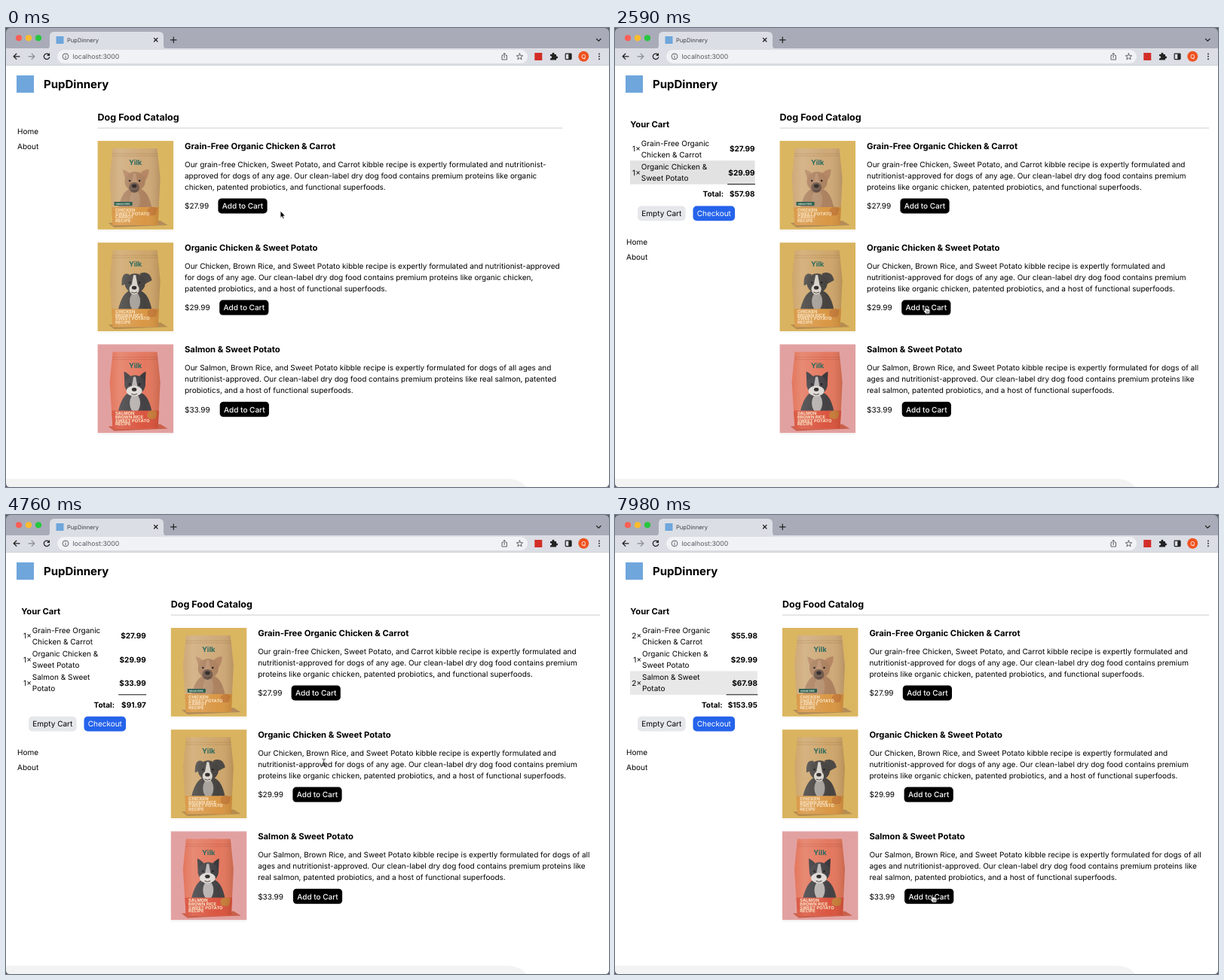
Animation of 800x610 px, one loop 8000 ms. Source, as an HTML page:

```html
<!DOCTYPE html>
<html lang="en">
<head>
<meta charset="utf-8">
<title>PupDinnery</title>
<style>
html, body { margin: 0; width: 100%; height: 100%; overflow: hidden; background: #fff; }
svg { display: block; width: 100vw; height: 100vh; font-family: Inter, sans-serif; font-size: 10px; text-rendering: geometricPrecision; }
</style>
</head>
<body>
<svg id="stage" viewBox="0 0 800 610" xmlns="http://www.w3.org/2000/svg">
  <defs>
    <linearGradient id="sheen">
      <stop offset="0" stop-color="#fff" stop-opacity=".02"/>
      <stop offset=".2" stop-color="#fff" stop-opacity=".16"/>
      <stop offset=".7" stop-color="#fff" stop-opacity=".03"/>
      <stop offset="1" stop-color="#402000" stop-opacity=".16"/>
    </linearGradient>
  </defs>
  <g id="chrome"></g>
  <g id="page"></g>
  <g id="cursor"></g>
</svg>
<script>
const LOOP = 8000, FADE = 700, PITCH = 135.2, ROW = 31.2;
const SHOP = 'PupDinnery', BRAND = 'Yilk';
const $ = id => document.getElementById(id);

const text = (x, y, s, attrs = '') =>
  `<text x="${x}" y="${y}" ${attrs}>${s.replace(/&/g, '&amp;')}</text>`;
const rect = (x, y, w, h, fill, r = 0) =>
  `<rect x="${x}" y="${y}" width="${w}" height="${h}" rx="${r}" fill="${fill}"/>`;
const disc = (x, y, r, fill) => `<circle cx="${x}" cy="${y}" r="${r}" fill="${fill}"/>`;
const oval = (x, y, rx, ry, fill) => `<ellipse cx="${x}" cy="${y}" rx="${rx}" ry="${ry}" fill="${fill}"/>`;
const fill = (d, c) => `<path d="${d}" fill="${c}"/>`;
const line = (d, c = '#222', w = 1.2) =>
  `<path d="${d}" fill="none" stroke="${c}" stroke-width="${w}" stroke-linecap="round" stroke-linejoin="round"/>`;
const bold = size => ` font-weight="700" font-size="${size}" `;
const END = 'text-anchor="end"', MID = 'text-anchor="middle"';
const money = cents => '$' + (cents / 100).toFixed(2);

// breaks: [before the cart shows, one item in the cart, more items]
const NARROW = ['nutritionist', 'proteins'];
const products = [
  { name: 'Grain-Free Organic Chicken & Carrot', cart: ['Grain-Free Organic', 'Chicken & Carrot'],
    price: 2799, button: 44.7,
    body: 'Our grain-free Chicken, Sweet Potato, and Carrot kibble recipe is expertly formulated and nutritionist-approved for dogs of any age. Our clean-label dry dog food contains premium proteins like organic chicken, patented probiotics, and functional superfoods.',
    breaks: [['approved', 'chicken, p'], NARROW, NARROW],
    label: ['CHICKEN', 'SWEET POTATO', 'CARROT', 'RECIPE'],
    back: '#dbb661', bag: '#cda775', shade: '#b48c58', base: '#d8943f',
    fur: '#a97d5a', ear: '#b3835f', blaze: '#b88e6c', muzzle: '#6b5142', muzzleR: 7, chest: '#b38d6b',
    ears: 'M38 56L33 38Q41 40 47 48ZM53 47Q59 38 68 38Q68 48 61 56Z' },
  { name: 'Organic Chicken & Sweet Potato', cart: ['Organic Chicken &', 'Sweet Potato'],
    price: 2999, button: 46.5,
    body: 'Our Chicken, Brown Rice, and Sweet Potato kibble recipe is expertly formulated and nutritionist-approved for dogs of any age. Our clean-label dry dog food contains premium proteins like organic chicken, patented probiotics, and a host of functional superfoods.',
    breaks: [['for dogs', 'patented'], ['approved', 'organic'], NARROW],
    label: ['CHICKEN', 'BROWN RICE', 'SWEET POTATO', 'RECIPE'],
    back: '#d9b35f', bag: '#cda468', shade: '#b68c50', base: '#d8943f',
    fur: '#3f3c39', ear: '#45413e', blaze: '#d5cfc6', muzzle: '#d8d2c9', muzzleR: 6.5, chest: '#a29c95',
    ears: 'M42 42Q31 38 32 57L40 54ZM56 41Q69 36 72 50L61 56Z' },
  { name: 'Salmon & Sweet Potato', cart: ['Salmon & Sweet', 'Potato'],
    price: 3399, button: 47,
    body: 'Our Salmon, Brown Rice, and Sweet Potato kibble recipe is expertly formulated for dogs of all ages and nutritionist-approved. Our clean-label dry dog food contains premium proteins like real salmon, patented probiotics, and a host of functional superfoods.',
    breaks: [['nutritionist', 'probiotics'], ['ages', 'salmon, p'], ['ages', 'real']],
    label: ['SALMON', 'BROWN RICE', 'SWEET POTATO', 'RECIPE'],
    back: '#e2a1a1', bag: '#e3745a', shade: '#c9604b', base: '#d9503a',
    fur: '#3d3b3e', ear: '#343236', blaze: '#b7b2b1', muzzle: '#ddd8d4', muzzleR: 10.5, chest: '#b5afad',
    ears: 'M36 56L35 36Q42 39 47 47ZM52 47Q57 39 64 36L63 56Z' },
];

// right: edge of the price column, col: its width, added: row just changed
const states = [
  { t: 0, qty: [0, 0, 0], x: 121.6, end: 738 },
  { t: 910, qty: [1, 0, 0], right: 184.5, col: 34.5, added: 0 },
  { t: 2420, qty: [1, 1, 0], right: 185.6, col: 36, added: 1 },
  { t: 3700, qty: [1, 1, 1], right: 185.8, col: 36.2, added: 2 },
  { t: 5450, qty: [2, 1, 1], right: 188.1, col: 39.5, added: 0 },
  { t: 7700, qty: [2, 1, 2], right: 189, col: 41, added: 2 },
].map(s => ({ x: s.right + 33, end: 788, ...s }));

// pointer stops: time, x, y
const stops = [
  [0, 364, 243], [250, 364, 243], [640, 309, 236], [1200, 309, 236], [1600, 357, 248], [1750, 357, 248],
  [2200, 412, 369], [2650, 412, 369], [3250, 423, 498], [4070, 423, 498], [5220, 421, 237],
  [5800, 414, 237], [6820, 432, 504], [7150, 421, 504], [LOOP, 421, 504],
];

function wrap(body, marks) {
  const cuts = [0, ...marks.map(m => body.indexOf(m)), body.length];
  return cuts.slice(1).map((end, i) => body.slice(cuts[i], end).trim());
}

function dog(p) {
  return fill('M27 90Q32 68 42 64H57Q68 68 72 90Z', p.fur) + oval(49.5, 78, 7, 12, p.chest) +
    fill(p.ears, p.ear) + oval(49.5, 54, 13.5, 13, p.fur) +
    fill('M47.5 43H50.5L53 57H45Z', p.blaze) + oval(48.5, 62, p.muzzleR, 7, p.muzzle) +
    oval(48.5, 60, 3.2, 2.4, '#211d1c') + line('M45 66Q48.5 68.5 52 66', '#3d302b', 1) +
    disc(42.5, 53, 1.3, '#171515') + disc(55.5, 53, 1.3, '#171515');
}

function photo(p) {
  const bag = 'M20 10H79L83 50L80 112H20L16 50Z';
  return rect(0, 119, 100.5, 1, '#f0f0f0') + rect(0, 0, 100.5, 117.8, p.back) +
    fill('M14 109L83 106L93 112L22 115Z', p.shade) + fill(bag, p.bag) +
    line('M20 17H79M20 20H79', p.shade, .7) + dog(p) +
    fill('M18.6 88H81.4L80 112H20Z', p.base) +
    fill('M66 91Q72 85 79 90L77 98Q71 101 66 97Z', '#c77a35') + fill(bag, 'url(#sheen)') +
    (p === products[0] ? rect(22, 81, 24, 5, '#2c5d50') + text(24, 84.8, 'GRAIN FREE', bold(3.2) + 'fill="#e8f0dd"') : '') +
    text(50, 32, BRAND, bold(9.5) + MID + ' fill="#2b6a5f"') +
    p.label.map((s, i) => text(23.3, 94 + i * 4.6, s, bold(5.8) + 'fill="#f8e3c4"')).join('');
}

function product(p, i, s, layout) {
  const y = i * PITCH, x = s.x + 115.4, bx = x + p.button;
  return `<g transform="translate(${s.x} ${150 + y})">${photo(p)}</g>` +
    text(x, 161 + y, p.name, bold(11.25)) +
    wrap(p.body, p.breaks[layout]).map((l, k) => text(x, 185 + y + k * 15, l)).join('') +
    text(x, 240.2 + y, money(p.price)) +
    rect(bx - .3, 226.4 + y, 65.2, 20, '#000', 4.5) +
    text(bx + 32.3, 240.2 + y, 'Add to Cart', 'fill="#fff" font-weight="500" ' + MID);
}

function cart(s) {
  const rows = s.qty.filter(q => q).length, y = rows * ROW;
  const itemX = s.qty.some(q => q > 1) ? 36 : 34.8;
  const total = s.qty.reduce((sum, q, i) => sum + q * products[i].price, 0);
  const left = s.right - s.col;
  let out = text(20.3, 132, 'Your Cart', bold(11.25)) +
    `<rect id="glow" x="20" y="${145 + s.added * ROW}" width="${s.right - 20}" height="31.5"/>`;
  products.slice(0, rows).forEach((p, i) => {
    const r = i * ROW;
    out += text(itemX - 1, 164.4 + r, s.qty[i] + '×', END) +
      text(itemX, 157 + r, p.cart[0]) + text(itemX, 172 + r, p.cart[1]) +
      text(s.right, 164.4 + r, money(p.price * s.qty[i]), END + bold(10));
  });
  return out + line(`M${left} ${145.2 + y}H${s.right}`, '#111', 1) +
    text(left - 5.5, 162 + y, 'Total:', END + bold(10)) +
    text(s.right, 162 + y, money(total), END + bold(10)) +
    rect(30, 174.1 + y, 63.6, 19.7, '#e5e7eb', 5) + text(61.8, 187.6 + y, 'Empty Cart', MID) +
    rect(103.5, 174.1 + y, 55.6, 19.7, '#2563eb', 5) +
    text(131.3, 187.6 + y, 'Checkout', MID + ' fill="#fff"');
}

function page(s) {
  const n = states.indexOf(s), navY = n ? 225.4 + s.qty.filter(q => q).length * ROW : 141;
  return text(s.x, 122.6, 'Dog Food Catalog', bold(12.5)) +
    rect(s.x, 132.3, s.end - s.x, 1.4, '#dcdcdc') +
    products.map((p, i) => product(p, i, s, Math.min(n, 2))).join('') +
    (n ? cart(s) : '') + text(15, navY, 'Home') + text(15, navY + 20, 'About');
}

function chrome() {
  const star = Array.from({ length: 10 }, (_, i) => {
    const a = i * Math.PI / 5 - Math.PI / 2, r = i % 2 ? 1.9 : 4.4;
    return (681.5 + r * Math.cos(a)).toFixed(1) + ' ' + (38.2 + r * Math.sin(a)).toFixed(1);
  }).join('L');
  return rect(0, 0, 800, 610, '#fff') + rect(0, 0, 800, 28, '#a9acb8') + rect(0, 27, 800, 22.5, '#dcdee5') +
    rect(0, 49, 800, .8, '#c9cbd1') +
    fill('M53 28Q58 28 58 23V11Q58 5 64 5H203Q209 5 209 11V23Q209 28 214 28Z', '#dcdee5') +
    ['#fb5f57', '#fdbc2e', '#28c63f'].map((c, i) => disc(17 + i * 13, 13.3, 4.1, c)).join('') +
    rect(66.5, 11, 10, 10, '#6fa6dc') +
    text(81, 18.7, SHOP, 'font-size="7.6" fill="#40434a"') +
    line('M196.5 13.5L201 18M201 13.5L196.5 18M222.3 12V19.6M218.5 15.8H226.1') +
    line('M783.5 14.5L786.3 17.3L789.1 14.5') +
    line('M18 37.8H10.3M13.8 34.2L10.2 37.8L13.8 41.4', '#222', 1.3) +
    line('M30 37.8H37.7M34.2 34.2L37.8 37.8L34.2 41.4', '#85888f', 1.2) +
    line('M56.8 35.4A3.7 3.7 0 1 0 57.6 38.8', '#222', 1.3) + fill('M58 33V37H54Z', '#222') +
    rect(68, 29, 624, 18, '#f1f2f5', 9) +
    `<circle cx="79" cy="37.8" r="3.9" fill="none" stroke="#5f6368"/>` +
    line('M79 37.5V39.8M79 35.8V35.9', '#5f6368', 1) +
    text(88.5, 41, 'localhost:3000', 'font-size="8.75" fill="#55585e"') +
    line('M659.2 36.5H658V42H664.5V36.5H663.3M661.2 39.5V33.5M659.4 35.2L661.2 33.4L663 35.2', '#5f6368', 1) +
    line(`M${star}Z`, '#5f6368', 1) +
    rect(701.3, 33, 10, 10, '#d32d27') +
    fill('M722 35H724.5A1.6 1.6 0 1 1 727.5 35H730V37.5A1.6 1.6 0 1 1 730 40.5V42.5H722V40.3A1.6 1.6 0 1 0 722 37.3Z', '#222') +
    `<rect x="742.2" y="34.2" width="7.8" height="7.4" rx=".8" fill="none" stroke="#222" stroke-width="1.2"/>` +
    rect(746.3, 34.2, 3.8, 7.4, '#222') +
    disc(766.3, 37.8, 7, '#ee5321') + text(766.3, 40.8, 'Q', 'fill="#fff" font-size="8" ' + MID) +
    [34.4, 37.8, 41.2].map(y => disc(787, y, 1, '#333')).join('') +
    rect(14, 63, 23, 23, '#6fa6dc') + text(50, 79.6, SHOP, bold(15)) +
    fill('M0 599H664Q682 599 690 610H0Z', '#f3f3f3') +
    fill('M0 0H6Q0 0 0 6ZM800 0H794Q800 0 800 6ZM0 610H5Q0 610 0 605ZM800 610H795Q800 610 800 605Z', '#55575d');
}

const EDGE = 'stroke="#fff" stroke-width=".9" stroke-linejoin="round"';
const pointers = {
  arrow: `<path d="M0 0V9.4L2.1 7.5L3.6 10.7L5.2 10L3.8 6.9H6.6Z" ${EDGE}/>`,
  beam: line('M-2 -4.5Q0 -4.5 0 -3.2Q0 -4.5 2 -4.5M0 -3.2V3.4M-2 4.6Q0 4.6 0 3.4Q0 4.6 2 4.6M-1 1H1', '#333', .9),
  hand: '<path d="M-.9 .9Q0 -.5 .9 .9V4Q2 3.1 2.7 4.3Q3.9 3.5 4.4 4.8Q6 4.4 6 6V8.2Q6 9.2 5.2 11H.3L-3 6.8Q-2.8 5.2-.9 6.6Z" fill="#fff" stroke="#111" stroke-width=".9" stroke-linejoin="round"/>' +
    line('M1.2 7V9.3M2.7 7V9.3M4.2 7V9.3', '#111', .6),
};

function pointerAt(t) {
  const k = stops.findIndex((s, i) => i && t < s[0]);
  const [t0, x0, y0] = stops[k - 1], [t1, x1, y1] = stops[k];
  const u = (t - t0) / (t1 - t0), e = u * u * (3 - 2 * u);
  return [x0 + (x1 - x0) * e, y0 + (y1 - y0) * e];
}

function pointerKind(x, y, s) {
  const i = Math.floor((y - 150) / PITCH);
  if (!products[i]) return 'arrow';
  const ly = y - 150 - i * PITCH, lx = x - s.x - 115.4, bx = lx - products[i].button;
  if (ly > 76 && ly < 97 && bx > 0 && bx < 64.7) return 'hand';
  const overTitle = ly < 15 && lx < products[i].name.length * 5.7;
  return lx > 0 && (overTitle || (ly > 24 && ly < 70)) ? 'beam' : 'arrow';
}

let shown, kind;
function draw(t) {
  const s = states.filter(v => v.t <= t).pop();
  if (s !== shown) $('page').innerHTML = page(shown = s);
  if (s.added !== undefined) {
    const c = Math.round(216 + 39 * Math.min(1, (t - s.t) / FADE));
    $('glow').setAttribute('fill', `rgb(${c},${c},${c})`);
  }
  const [x, y] = pointerAt(t), k = pointerKind(x, y, s);
  if (k !== kind) $('cursor').innerHTML = pointers[kind = k];
  $('cursor').setAttribute('transform', `translate(${x.toFixed(2)} ${y.toFixed(2)})`);
}

$('chrome').innerHTML = chrome();
const start = performance.now();
function tick() {
  draw((performance.now() - start) % LOOP);
  requestAnimationFrame(tick);
}
tick();
</script>
</body>
</html>
```
